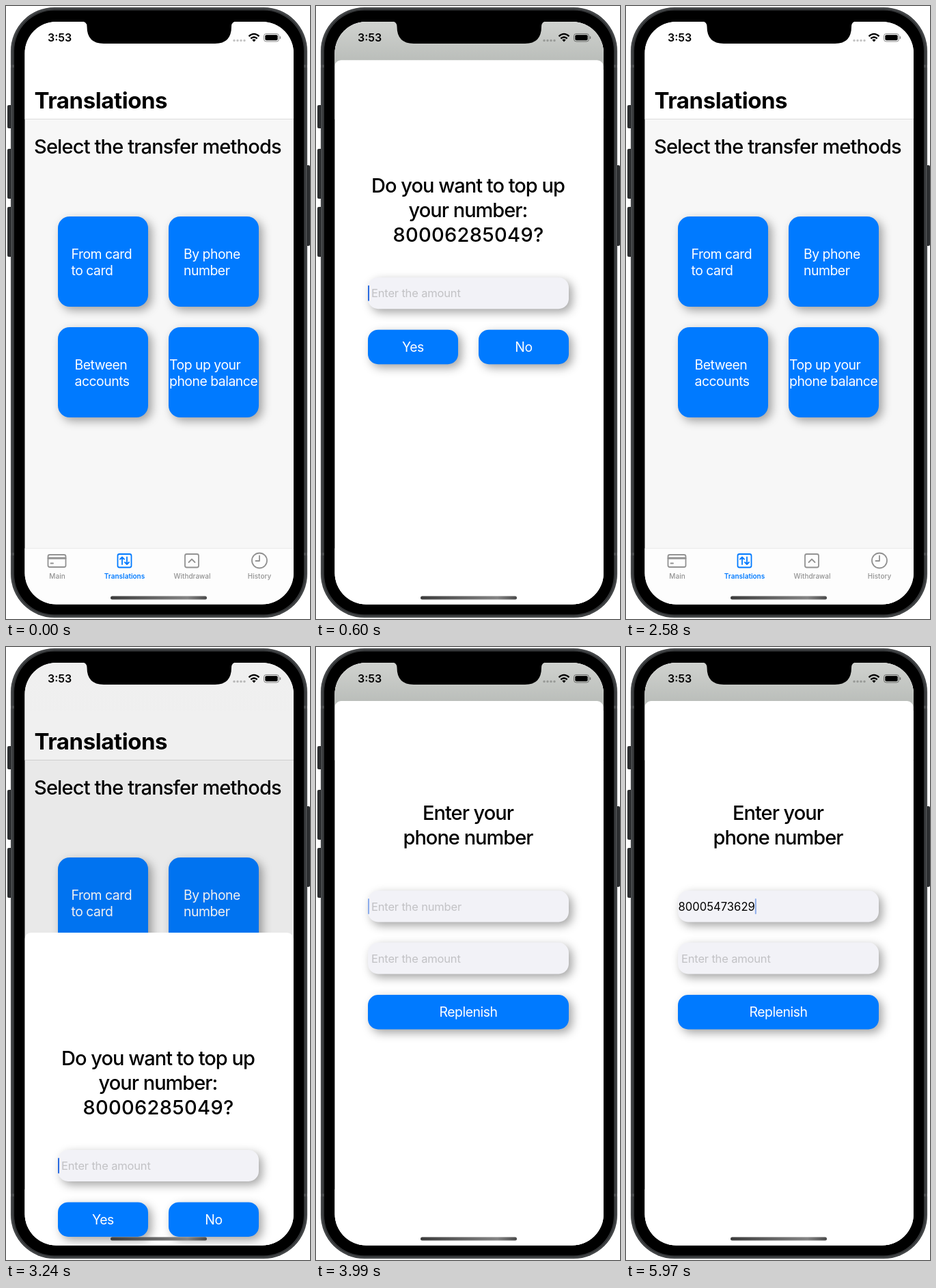
An HTML page for the animation above (6000 ms loop, 445 by 897 pixels).

```html
<!DOCTYPE html>
<html lang="en">
<head>
<meta charset="utf-8">
<title>Phone top-up</title>
<style>
html, body { margin: 0; width: 100%; height: 100%; overflow: hidden; background: #fff; }
svg { display: block; width: 445px; height: 897px; }
text { font-family: Inter, Roboto, sans-serif; font-optical-sizing: none; white-space: pre; }
.head { font-size: 29px; font-weight: 450; letter-spacing: -.034em; }
.wide { letter-spacing: -.029em; }
.num { letter-spacing: .01em; }
.label { font-size: 19.4px; letter-spacing: -.025em; fill: #fff; }
.input { font-size: 16.6px; }
.hint { font-size: 16.5px; letter-spacing: -.01em; fill: #c2c2c5; }
.tab { font-size: 10px; font-weight: 500; fill: #929292; text-anchor: middle; }
.mid { text-anchor: middle; }
.raised { filter: drop-shadow(5px 5px 7px rgba(0,0,0,.36)); }
.icon { fill: none; stroke: #929292; stroke-width: 1.8; stroke-linecap: round; stroke-linejoin: round; }
</style>
</head>
<body>
<svg id="stage" viewBox="0 0 445 897"></svg>
<script>
const BLUE = '#007aff', LOOP = 6000, STEP = 30, TRAVEL = 797;
const ASK_NUMBER = '80006285049', TYPED_NUMBER = '80005473629';
const AMOUNT_KEYS = [1350, 1680, 1860, 2010];
const NUMBER_KEYS = [4290, 4500, 4680, 4830, 4950, 5040, 5160, 5340, 5460, 5670, 5850];

const text = (x, y, s, cls, extra = '') => `<text x="${x}" y="${y}" class="${cls}" ${extra}>${s}</text>`;
const box = (x, y, w, h, r, fill, extra = '') =>
  `<rect x="${x}" y="${y}" width="${w}" height="${h}" rx="${r}" fill="${fill}" ${extra}/>`;
const raised = (x, y, w, h, r, fill) => box(x, y, w, h, r, fill, 'class="raised"');
const tile = (x, y, tx, a, b) => raised(x, y, 132, 132, 17, BLUE) +
  text(tx, y + 62, a, 'label') + text(tx, y + 86, b, 'label');
const button = (x, y, w, s, id) => `<g id="${id}">` + raised(x, y, w, 50.5, 15, BLUE) +
  text(x + w / 2, y + 32.3, s, 'label mid') + '</g>';
const field = (y, hint, id) => `<g id="${id}">` + raised(76, y, 294, 46, 15, '#f2f2f7') +
  text(81, y + 29, hint, 'hint') + text(76.5, y + 29, '', 'input') +
  box(76, y + 11.5, 2, 23, 1, '#2a6be0', 'class="cursor" opacity="0"') + '</g>';
const icon = (d, extra = '') => `<path class="icon" d="${d}" ${extra}/>`;

const home = box(27, 23, 395, 853, 0, '#f7f7f7') + box(27, 23, 395, 142, 0, '#fff') +
  box(27, 165, 395, 1, 0, '#dcdcdc') +
  text(41.5, 150, 'Translations', '', 'font-size="33" font-weight="700" letter-spacing="-.42"') +
  text(41, 216, 'Select the transfer methods', 'head wide') +
  tile(76, 308, 95.5, 'From card', 'to card') + tile(238, 308, 260, 'By phone', 'number') +
  tile(76, 470, 100.5, 'Between', 'accounts') + tile(238, 470, 239, 'Top up your', 'phone balance') +
  box(27, 794, 395, 82, 0, '#fdfdfd') + box(27, 793.5, 395, .7, 0, '#e2e2e2') +
  icon('M64 803H85Q87.500 803 87.500 805.500V818.500Q87.500 821 85 821H64Q61.500 821 61.500 818.500V805.500Q61.500 803 64 803Z') +
  icon('M62 808H87', 'style="stroke-width:3"') + icon('M65.500 815.500H69') +
  icon('M166 802H181Q183.500 802 183.500 804.500V819Q183.500 821.500 181 821.500H166Q163.500 821.500 163.500 819V804.500Q163.500 802 166 802ZM170 817V806.500M167 809.500L170 806.500L173 809.500M177 806.500V817M174 814L177 817L180 814', 'style="stroke:' + BLUE + '"') +
  icon('M264.500 802H279.500Q282 802 282 804.500V819Q282 821.500 279.500 821.500H264.500Q262 821.500 262 819V804.500Q262 802 264.500 802ZM267.500 814L272 809.500L276.500 814') +
  '<circle class="icon" cx="371" cy="811.500" r="11"/>' + icon('M371 804.500V812H365.500') +
  text(75, 838, 'Main', 'tab') + text(272.500, 838, 'Withdrawal', 'tab') + text(371, 838, 'History', 'tab') +
  text(173.500, 838, 'Translations', 'tab', `style="fill:${BLUE};font-weight:600"`);

const ask = text(222.500, 273, 'Do you want to top up', 'head mid') +
  text(222.500, 309, 'your number:', 'head mid') + text(223, 345, ASK_NUMBER + '?', 'head mid num') +
  field(397, 'Enter the amount', 'amount') +
  button(76, 473.500, 132, 'Yes', 'yes') + button(238, 473.500, 132, 'No', 'no');

const enter = text(222.500, 253, 'Enter your', 'head mid') + text(222.500, 289, 'phone number', 'head mid') +
  field(356.500, 'Enter the number', 'number') + field(432.500, 'Enter the amount', 'sum') +
  button(76, 509, 294, 'Replenish', 'replenish');

const METAL = '#343638';
const phone = [[2, 145, 34], [2, 209, 73], [2, 294, 73], [438, 233, 118]]
    .map(([x, y, h]) => box(x, y, 7, h, 2, '#2b2d2f')).join('') +
  box(7, 2, 434, 893, 64, METAL) + box(8.500, 3.500, 431, 890, 62.500, 'none', 'stroke="#55585a"') +
  box(12, 6.500, 424, 884, 59, '#000') +
  [[7, 86], [436, 86], [7, 800], [436, 800]].map(([x, y]) => box(x, y, 5, 4, 0, '#4b4d4f')).join('');

const status = text(61, 52, '3:53', '', 'font-size="16" font-weight="600"') +
  [334, 339, 344, 349].map(x => `<circle cx="${x}" cy="50.500" r="1.700" fill="#000" opacity=".23"/>`).join('') +
  '<g fill="none" stroke="#000" stroke-width="2.300"><path d="M355.500 44.300Q363 37.500 370.500 44.300"/><path d="M358.300 47.600Q363 43.300 367.700 47.600"/></g>' +
  '<path d="M360.300 49.600Q363 47.300 365.700 49.600L363 52.500Z"/>' +
  box(377.500, 40.500, 22, 11.500, 3.500, 'none', 'stroke="#000" stroke-opacity=".45"') +
  box(379.300, 42.300, 18.400, 7.900, 2, '#000') + box(400.800, 44.300, 1.400, 4, .7, '#000', 'opacity=".5"');

stage.innerHTML = `<defs>
  <clipPath id="screen">${box(27.5, 23, 393.5, 852.5, 46, '#000')}</clipPath>
  <linearGradient id="strip" x2="0" y2="1"><stop stop-color="#d0d2cf"/><stop offset="1" stop-color="#b5b9b5"/></linearGradient>
  <linearGradient id="bar"><stop stop-color="#3c3c3c"/><stop offset=".8" stop-color="#858585"/><stop offset="1" stop-color="#4a4a4a"/></linearGradient>
</defs>${phone}
<g clip-path="url(#screen)">${home}
  ${box(27, 23, 395, 853, 0, '#000', 'id="dim"')}
  ${box(27, 23, 395, 70, 0, 'url(#strip)', 'id="shade"')}
  <g id="sheet">${box(27.5, 79, 393, 850, 9, '#fff')}<g id="ask">${ask}</g><g id="enter">${enter}</g></g>
  ${box(153, 863.500, 141, 5, 2.500, 'url(#bar)', 'id="homeBar"')}
</g>
<path d="M108 22Q118.500 22 118.500 30Q118.500 55 143 55H306Q330 55 330 30Q330 22 340 22Z"/>${status}`;

const $ = id => document.getElementById(id);
const clamp = v => Math.max(0, Math.min(1, v));
// Critically damped spring: 1 at the start, decaying to 0.
const spring = (ms, rate) => { const k = Math.max(0, ms) * rate; return (1 + k) * Math.exp(-k); };

function lift(t) {
  if (t < 2370) return 1 - spring(t - 381, .05);
  if (t < 3000) return spring(t - 2370, .036);
  return 1 - spring(t - 3201.400, .05);
}

function blink(t) {
  if (t > 3180 && t < 3420) return 1;
  const u = t % 330;
  return u < 110 ? clamp(1 - u / 60) : clamp((u - 110) / 60);
}

const pressed = (t, start) => 1 - .6 * clamp(1 - Math.abs(t - start - 45) / 60);

function fill(id, value, cursor) {
  const [hint, input] = $(id).querySelectorAll('text');
  const caret = $(id).querySelector('.cursor');
  hint.setAttribute('opacity', value ? 0 : 1);
  if (input.textContent !== value) input.textContent = value;
  caret.setAttribute('x', value ? 76.500 + input.getComputedTextLength() : 76);
  caret.setAttribute('opacity', cursor);
}

const typed = (s, keys, t) => s.slice(0, keys.filter(k => t >= k).length);

function draw(t) {
  const p = lift(t), entering = t >= 3540;
  $('sheet').setAttribute('transform', `translate(0 ${TRAVEL * (1 - p)})`);
  $('sheet').style.display = p > .001 ? '' : 'none';
  $('dim').setAttribute('opacity', .1 * p);
  $('shade').setAttribute('opacity', p ** 8);
  $('ask').style.display = entering ? 'none' : '';
  $('enter').style.display = entering ? '' : 'none';
  $('yes').setAttribute('opacity', pressed(t, 2250));
  $('no').setAttribute('opacity', pressed(t, 3450));
  $('homeBar').setAttribute('fill', t >= 1260 && t < 2400 ? '#000' : 'url(#bar)');
  if (entering) fill('number', typed(TYPED_NUMBER, NUMBER_KEYS, t), blink(t));
  else fill('amount', t < 3000 ? typed('1000', AMOUNT_KEYS, t) : '', blink(t));
}

// The screen refreshes in fixed steps; the small lead absorbs timer rounding.
const start = performance.now();
function tick() {
  const steps = Math.floor((performance.now() - start + 3) / STEP);
  draw(steps * STEP % LOOP);
  requestAnimationFrame(tick);
}
tick();
</script>
</body>
</html>
```
